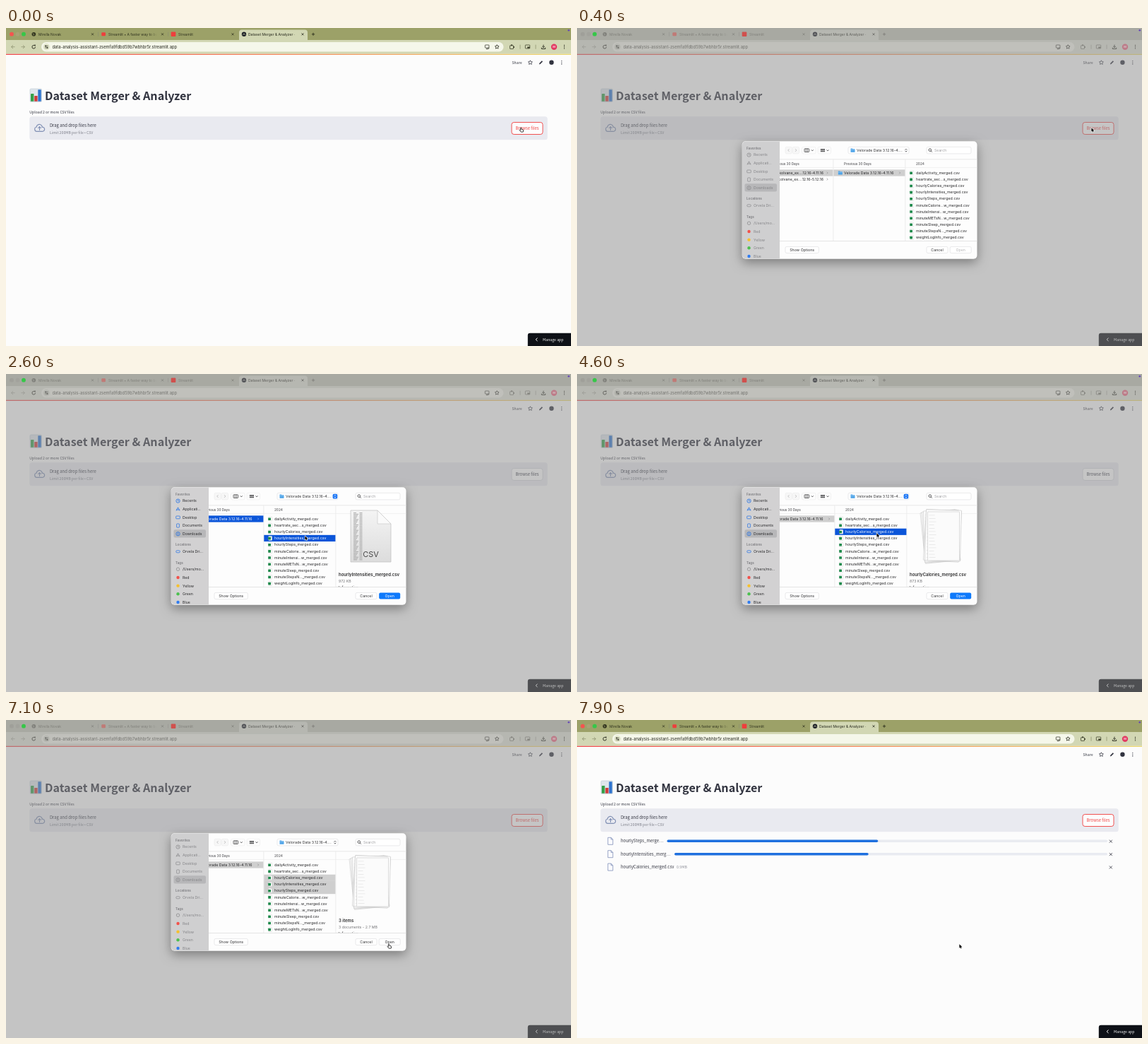
Write an HTML page with a canvas that moves like this. It is 800 px wide and 450 px high and loops after 8000 ms.

```html
<!DOCTYPE html>
<html lang="en">
<head>
<meta charset="utf-8">
<title>Dataset Merger &amp; Analyzer</title>
<style>
html, body { margin: 0; width: 100%; height: 100%; overflow: hidden; background: #fcfcfc; }
canvas { display: block; width: 800px; height: 450px; }
</style>
</head>
<body>
<canvas id="stage"></canvas>
<script>
const canvas = document.getElementById('stage');
const dpr = window.devicePixelRatio || 1;
canvas.width = 800 * dpr;
canvas.height = 450 * dpr;
const c = canvas.getContext('2d');

const LOOP = 8000, STEP = 100;
const UI = 'Inter, "Liberation Sans", sans-serif';
const SANS = '"Noto Sans CJK JP", "Noto Sans CJK SC", "Noto Sans CJK KR", "Noto Sans CJK TC", "Noto Sans CJK", "Noto Sans", sans-serif';
const SMALL = 5.2, BODY = 5.93;
const INK = '#31333f', RED = '#f0403f', BLUE = '#0b55d9';
const FOLDER = 'Velorade Data 3.12.16-4';
const FILES = ['dailyActivity', 'heartrate_sec...s', 'hourlyCalories', 'hourlyIntensities',
  'hourlySteps', 'minuteCalorie...w', 'minuteIntensi...w', 'minuteMETsN...w',
  'minuteSleep', 'minuteStepsN...', 'weightLogInfo'].map(n => n + '_merged.csv');

const clamp = v => Math.max(0, Math.min(1, v));
const ease = v => { v = clamp(v); return v * v * (3 - 2 * v); };

function mix(a, b, k) {
  const part = (h, i) => parseInt(h.slice(i, i + 2), 16);
  return 'rgb(' + [1, 3, 5].map(i => Math.round(part(a, i) + (part(b, i) - part(a, i)) * k)) + ')';
}

// Text is set large and scaled down so small sizes keep exact advances; y is the middle of the capitals.
function text(s, x, y, size, color, weight = 400, font = UI, align = 'left') {
  c.save();
  c.translate(x, y + size * 0.365);
  c.scale(0.1, 0.1);
  c.font = `${weight} ${size * 10}px ${font}`;
  c.textAlign = align;
  c.fillStyle = color;
  c.fillText(s, 0, 0);
  c.restore();
}

function box(x, y, w, h, r, fill, line, lw = 0.7) {
  c.beginPath();
  c.roundRect(x, y, w, h, r);
  if (fill) { c.fillStyle = fill; c.fill(); }
  if (line) { c.strokeStyle = line; c.lineWidth = lw; c.stroke(); }
}

function dot(x, y, r, fill, line, lw = 0.8) {
  c.beginPath();
  c.arc(x, y, r, 0, 7);
  if (fill) { c.fillStyle = fill; c.fill(); }
  if (line) { c.strokeStyle = line; c.lineWidth = lw; c.stroke(); }
}

function path(pts, x, y, line, lw = 0.9, fill) {
  c.beginPath();
  for (let i = 0; i < pts.length; i += 2) c.lineTo(x + pts[i], y + pts[i + 1]);
  if (fill) { c.closePath(); c.fillStyle = fill; c.fill(); }
  if (line) { c.strokeStyle = line; c.lineWidth = lw; c.lineJoin = 'round'; c.stroke(); }
}

function cross(x, y, r, color, lw = 0.8) {
  path([-r, -r, r, r], x, y, color, lw);
  path([-r, r, r, -r], x, y, color, lw);
}

function star(x, y, r, color) {
  const pts = [];
  for (let i = 0; i <= 10; i++) {
    const a = i * Math.PI / 5 - Math.PI / 2, q = i % 2 ? r * 0.5 : r;
    pts.push(q * Math.cos(a), q * Math.sin(a));
  }
  path(pts, x, y, color, 0.8);
}

const dots = (x, y, color) => [-2.2, 0, 2.2].forEach(d => dot(x, y + d, 0.65, color));

function chrome(k) {
  const ink = mix('#30331f', '#80807b', k), strong = mix('#24261a', '#5e5e5a', k);
  const bar = mix('#d2d7b4', '#b6b7b1', k), strip = mix('#9ca168', '#a8a9a2', k);
  const red = mix('#ee3e3c', '#c07a76', k), pale = mix('#8d9270', '#9a9a95', k);
  c.fillStyle = strip;
  c.fillRect(0, 0, 800, 18);
  c.fillStyle = bar;
  c.fillRect(0, 17, 800, 19.5);
  box(330, 2.5, 97, 17, [4, 4, 0, 0], bar);

  dot(8, 8.7, 2.9, mix('#f4544f', '#9f9f99', k));
  dot(16.5, 8.7, 2.9, mix('#a8a276', '#a2a29c', k));
  dot(25, 8.7, 2.9, '#35c748');

  dot(39.3, 8.8, 2.8, ink);
  path([-1.5, -1, 0.5, 0, -0.6, 1.6], 39.3, 8.8, strip, 0.8);
  text('Mirella Novak', 46, 8.8, 5, ink);
  box(135.3, 6.3, 5.6, 5, 1, red);
  c.save();
  c.beginPath();
  c.rect(145, 2, 69, 14);
  c.clip();
  text('Streamlit • A faster way to build', 145, 8.8, 5, ink);
  c.restore();
  const fade = c.createLinearGradient(203, 0, 214, 0);
  fade.addColorStop(0, strip.replace(')', ',0)').replace('rgb', 'rgba'));
  fade.addColorStop(1, strip);
  c.fillStyle = fade;
  c.fillRect(203, 4, 12, 10);
  box(233.7, 5.6, 6.6, 6.4, 1, mix('#ee3e3c', '#d0504d', k));
  text('Streamlit', 244, 8.8, 5, ink);
  dot(337, 8.8, 3.2, mix('#22252b', '#55565a', k));
  path([-1.7, 0.4, 0, -0.8, 1.7, 0.4], 337, 9, bar, 0.8);
  text('Dataset Merger & Analyzer · ', 343, 8.8, 5, strong);
  [122.5, 221.5, 321].forEach(x => cross(x, 8.8, 1.5, ink));
  cross(420, 8.8, 1.5, strong);
  [130.5, 229.5].forEach(x => path([0, -3, 0, 3], x, 8.8, pale, 0.8));
  path([-2.1, 0, 2.1, 0], 435, 8.8, ink);
  path([0, -2.1, 0, 2.1], 435, 8.8, ink);
  dot(796.8, 3.2, 1.3, '#6546b8');

  [[10, 1], [24, -1]].forEach(([x, d]) => {
    path([-2.5 * d, 0, 2.5 * d, 0], x, 26.7, pale, 0.8);
    path([0, -2.3, -2.5 * d, 0, 0, 2.3], x, 26.7, pale, 0.8);
  });
  c.beginPath();
  c.arc(39.2, 26.8, 2.3, 0, 5.2);
  c.strokeStyle = strong;
  c.lineWidth = 0.9;
  c.stroke();
  path([0, -2, 2, 0, 2.4, -2.6], 39.4, 26, null, 0, strong);
  box(50, 20, 654.5, 13.4, 6.7, mix('#f5f7ea', '#c0c0bb', k));
  dot(57.3, 26.7, 4.6, mix('#dfe3c8', '#b4b5af', k));
  [-1.2, 1.2].forEach(d => {
    path([-2.2, 0, 2.2, 0], 57.3, 26.7 + d, strong, 0.7);
    dot(57.3 + d, 26.7 + d, 0.9, strong);
  });
  text('data-analysis-assistant-zsemfa9fdbd59b7wbhbr5r.streamlit.app', 65.5, 26.7, 5.8, mix('#24261c', '#73736f', k));

  box(678.3, 24, 5.6, 4, 0.6, null, strong);
  path([-1.4, 0, 1.4, 0], 681.2, 29.6, strong);
  path([0, 1.8, 0, 3.4, 1.5, 2.2], 683, 26, strong, 0.7);
  star(695.2, 26.7, 3, strong);
  box(713.5, 24.7, 5, 4.8, 0.5, null, ink);
  dot(716, 24.2, 1, ink);
  dot(719, 27, 1, ink);
  [728, 750].forEach(x => path([0, -3, 0, 3], x, 26.7, pale, 0.8));
  box(735.3, 24, 6.4, 5, 0.6, null, ink);
  path([0, 0, 3.4, 0, 3.4, 2, 0, 2], 738.2, 26.6, null, 0, ink);
  path([0, -3, 0, 1], 761, 26.7, strong);
  path([-1.7, -0.7, 0, 1, 1.7, -0.7], 761, 26.7, strong);
  path([-2.7, 1, -2.7, 2.8, 2.7, 2.8, 2.7, 1], 761, 26.7, strong);
  dot(776, 26.7, 4.2, mix('#e23b63', '#bd7b88', k));
  text('M', 776, 26.7, 4, mix('#ffffff', '#d9d9d9', k), 500, UI, 'center');
  dots(790.5, 26.7, strong);
}

function docIcon(x, y) {
  path([-3.4, -5, 1, -5, 3.6, -2.3, 3.6, 5, -3.4, 5], x, y, '#7e8fb8', 0.8, '#fcfcfe');
  path([1, -5, 1, -2.3, 3.6, -2.3], x, y, '#7e8fb8', 0.8);
}

function uploads(t) {
  const grow = (t - 7500) / 400;
  const rows = [['hourlySteps_merge…', 127.5, 0.479], ['hourlyIntensities_merg…', 138, 0.448], ['hourlyCalories_merged.csv', 0, 0]];
  rows.forEach(([name, x, p], i) => {
    const y = 171.3 + i * 18.4;
    docIcon(47.2, y);
    text(name, 62, y - 0.2, BODY, INK, 400, SANS);
    if (x) {
      box(x, y - 1.8, 751 - x, 3.5, 1.7, '#e9ebf1');
      const w = (751 - x) * p * grow;
      if (w > 1) box(x, y - 1.8, w, 3.5, 1.7, '#1f70df');
    } else {
      text('0.9MB', 141, y, SMALL, '#8b8d97', 400, SANS);
    }
    cross(755.8, y + 0.4, 2, INK, 0.8);
  });
}

function page(hover) {
  c.fillStyle = '#fcfcfc';
  c.fillRect(0, 36, 800, 414);
  const line = c.createLinearGradient(0, 0, 800, 0);
  line.addColorStop(0, '#f0484c');
  line.addColorStop(0.5, '#f7895c');
  line.addColorStop(1, '#ecd96e');
  c.fillStyle = line;
  c.fillRect(0, 36.5, 800, 1.5);

  text('Share', 716.5, 49, SMALL, INK, 400, SANS);
  star(742.4, 48.9, 3.1, INK);
  path([-2.4, 2.5, -2, 0.8, 1.5, -2.7, 2.7, -1.5, -0.8, 2], 757.3, 48.9, null, 0, INK);
  dot(772.4, 48.7, 3.2, INK);
  dots(786.8, 48.8, INK);

  box(34, 86, 16.5, 18.5, 1.5, '#dfe6ec', '#b9c6d2', 0.6);
  [[35, 93, '#36a04a'], [40.2, 96, '#cf3b3b'], [45.3, 87.3, '#2f74cf']].forEach(([x, y, f]) => box(x, y, 4.4, 103.8 - y, 0.4, f));
  text('Dataset Merger & Analyzer', 55, 96, 16.1, INK, 700, SANS);
  text('Upload 2 or more CSV files', 33.2, 118.7, SMALL, INK, 400, SANS);

  box(33.3, 125.3, 733.4, 33, 3.5, '#e9eaf0');
  c.beginPath();
  c.arc(43.9, 143.2, 3.2, 1.5, 4.6);
  c.arc(47.2, 140.6, 4.2, 3.4, 6);
  c.arc(51.6, 143.3, 3, 4.5, 1.6);
  c.closePath();
  c.strokeStyle = '#8190b4';
  c.lineWidth = 1.2;
  c.stroke();
  path([0, 4.5, 0, -1], 47.5, 140.5, '#8190b4', 1.1);
  path([-2, 1, 0, -1.2, 2, 1], 47.5, 140.8, '#8190b4', 1.1);
  text('Drag and drop files here', 62, 137.5, BODY, INK, 400, SANS);
  text('Limit 200MB per file • CSV', 62, 147.7, SMALL, '#7d7f89', 400, SANS);
  box(716, 133.5, 44, 17, 3.2, '#fdfdfe', hover ? RED : '#d3d5db', 0.9);
  text('Browse files', 738, 142.1, BODY, hover ? RED : INK, 400, SANS, 'center');

  box(738.8, 431.8, 62, 19, [3, 0, 0, 0], '#0e1117');
  path([1.2, -2.2, -1.2, 0, 1.2, 2.2], 751.3, 440.8, '#fafafa', 1);
  text('Manage app', 760, 440.8, SMALL, '#fafafa', 400, SANS);
}

function folderIcon(x, y, fill = '#4da3e8') {
  path([-3, -2.6, -0.6, -2.6, 0.2, -1.8, 3, -1.8, 3, 2.6, -3, 2.6], x, y, null, 0, fill);
  path([-3, -0.8, 3, -0.8], x, y, '#a9d6f7', 0.6);
}

function sidebar(on) {
  box(234, 160.5, 53, 166, [5, 0, 0, 5], on ? '#d2d1d2' : '#cfcfd0');
  box(237.5, 220.2, 45.5, 11.4, 2, '#b7b7b9');
  const head = (s, y) => text(s, 240, y, 4.6, '#7d7d80', 600);
  head('Favorites', 170.2);
  head('Locations', 241.7);
  head('Tags', 267);
  const label = on ? '#29292b' : '#858588', tint = on ? '#1b6ce5' : '#89898c';
  const item = (s, y) => text(s, 250, y, 5.2, label);
  ['Recents', 'Applicati...', 'Desktop', 'Documents', 'Downloads'].forEach((s, i) => {
    const y = 179.6 + i * 11.65;
    item(s, y);
    if (i === 0 || i === 4) {
      dot(243.5, y, 2.6, null, tint);
      path(i ? [0, -1.5, 0, 1.4] : [0, -1.5, 0, 0.2, 1.2, 0.2], 243.5, y, tint, 0.7);
    } else if (i === 1) {
      path([-2.4, 2.2, 0, -2.4, 2.4, 2.2], 243.5, y, tint, 0.8);
      path([-2.6, 0.9, 2.6, 0.9], 243.5, y, tint, 0.7);
    } else if (i === 2) {
      box(240.7, y - 1.9, 5.6, 3.8, 0.7, null, tint);
    } else {
      box(241.6, y - 2.6, 3.8, 5.2, 0.6, null, tint);
    }
  });
  item('Orvela Dri...', 251.2);
  box(240.7, 249.8, 5.6, 3, 1.5, null, tint);
  item('/Users/mo...', 276.2);
  dot(243.5, 276.2, 2.2, null, '#77777a', 0.6);
  [['Red', '#f2514b'], ['Yellow', '#f6c02c'], ['Green', '#4cc04f'], ['Blue', '#2f7cf0']].forEach(([s, f], i) => {
    const y = 288 + i * 11.65;
    item(s, y);
    dot(243.5, y, 2.2, f);
  });
}

function sheet(x, y, w, h, turn) {
  c.save();
  c.translate(x, y);
  c.rotate(turn);
  box(-w / 2, -h / 2, w, h, 0.5, '#fbfbfb', '#bdbdbd', 0.5);
  c.fillStyle = '#dedede';
  for (let i = 1; i < 15; i++) c.fillRect(-w / 2 + 2, -h / 2 + i * h / 15, 7 + i * 5 % 4, 0.6);
  c.restore();
}

function preview(t, x) {
  const stack = t >= 3700 && t < 4700 || t >= 5600;
  if (stack) {
    [-0.1, -0.065, -0.03, 0.06, 0.03].forEach((a, i) => sheet(x + 47.5 + i, 230 - i * 0.4, 50, 72, a));
    sheet(x + 52, 229.5, 45, 69, 0);
  } else {
    const g = c.createLinearGradient(0, 193, 0, 266);
    g.addColorStop(0, '#f4f4f4');
    g.addColorStop(1, '#dcdcdc');
    path([0, 0, 38, 0, 57, 19, 57, 73, 0, 73], x + 21, 193, '#bdbdbd', 0.7, g);
    path([38, 0, 38, 19, 57, 19], x + 21, 193, '#c4c4c4', 0.6, '#fafafa');
    c.fillStyle = '#a4a4a4';
    for (let i = 0; i < 36; i++) {
      c.fillRect(x + 25, 196 + i * 1.9, 4 + i * 7 % 4, 0.9);
      c.fillRect(x + 33.5, 196 + i * 1.9, 4 + i * 5 % 5, 0.9);
    }
    text('CSV', x + 49.5, 255.2, 11, '#4a4a4a', 400, UI, 'center');
  }
  const [name, size] = t < 3700 ? [FILES[3], '972 KB'] : t < 4600 ? ['2 items', '2 documents - 1.8 MB']
    : t < 5600 ? [FILES[2], '873 KB'] : ['3 items', '3 documents - 2.7 MB'];
  text(name, x + 4, 284.2, 6, '#2a2a2b', 600);
  text(size, x + 4, 292.8, 5.25, '#747477');
  text('Information', x + 4, 302.3, 5, '#2a2a2b', 600);
}

function columns(t, on) {
  const shift = 100 * ease((t - 2300) / 200);
  const sel = t < 2400 ? [] : t < 3700 ? [3] : t < 4600 ? [2, 3] : t < 5600 ? [2] : [2, 3, 4];
  const grey = '#cfcfcf', ink = '#242426';
  c.save();
  c.beginPath();
  c.rect(287, 186, 279.5, 115.5);
  c.clip();
  c.translate(-shift, 0);
  const head = (s, x) => text(s, x, 192.2, 4.6, '#6b6b6e', 600);
  head('Previous 30 Days', 276);
  head('Previous 30 Days', 378);
  head('2024', 480);
  c.fillStyle = '#ececec';
  c.fillRect(260, 197, 420, 0.7);
  [362.4, 464.4, 566.4].forEach(x => c.fillRect(x, 186, 0.9, 116));

  const rowBar = (x, w, y, f) => { c.fillStyle = f; c.fillRect(x, y - 4.6, w, 9.2); };
  const arrow = (x, y, f) => path([-0.7, -1.4, 0.7, 0, -0.7, 1.4], x, y, f, 0.7);
  rowBar(260, 102.4, 205, grey);
  text('kolvane_ex....12.16-4.11.16', 349, 205, 5.3, ink, 400, UI, 'right');
  text('kolvane_ex....12.16-5.12.16', 349, 214.1, 5.3, ink, 400, UI, 'right');
  [205, 214.1].forEach(y => arrow(354.5, y, '#8b8b8d'));
  const live = on && t < 2700;
  rowBar(363.3, 101.1, 205, live ? BLUE : grey);
  folderIcon(372.8, 205);
  text(FOLDER + '.11.16', 378, 205, 5.3, live ? '#ffffff' : ink);
  arrow(457, 205, live ? '#8fb4f4' : '#8b8b8d');

  FILES.forEach((name, i) => {
    const y = 205 + i * 9.14, picked = sel.includes(i);
    if (picked) rowBar(465.3, 101.1, y, on ? BLUE : grey);
    box(471.8, y - 3, 4.8, 6, 0.4, '#ffffff', '#c4c9c6', 0.4);
    box(471.2, y - 1.6, 3.8, 3.6, 0.4, '#1f8a4c');
    text(name, 480, y, 5.3, picked && on ? '#ffffff' : ink);
  });
  if (t >= 2400) preview(t, 567);
  c.restore();
}

function dialog(t, o, on) {
  c.save();
  c.globalAlpha = o;
  c.translate(0, -16 * (1 - o));
  c.save();
  c.shadowColor = 'rgba(0,0,0,.38)';
  c.shadowBlur = 16 * dpr;
  c.shadowOffsetY = 5 * dpr;
  box(233.7, 160.3, 332.8, 166.4, 5, '#fdfdfd');
  c.restore();
  c.save();
  c.beginPath();
  c.roundRect(233.7, 160.3, 332.8, 166.4, 5);
  c.clip();
  sidebar(on);
  c.fillStyle = '#e2e2e2';
  c.fillRect(287, 185.5, 280, 0.8);
  columns(t, on);
  c.fillStyle = '#dfdfdf';
  c.fillRect(287, 301.2, 280, 0.8);

  const edge = '#dcdcde', ink = '#2e2e30', down = [-1.4, -0.7, 0, 0.8, 1.4, -0.7];
  [[295, 1], [305.3, -1]].forEach(([x, d]) => {
    box(x, 168.3, 9.3, 9.6, 1.8, '#f7f7f7', '#e6e6e6', 0.5);
    path([0.9 * d, -1.9, -0.9 * d, 0, 0.9 * d, 1.9], x + 4.6, 173, '#b5b5b7', 0.8);
  });
  box(318.5, 168.3, 19.5, 9.6, 1.8, '#fdfdfd', '#e6e6e6', 0.5);
  box(322, 170.8, 6.6, 4.6, 0.6, null, ink);
  [324.2, 326.4].forEach(x => path([0, 0, 0, 4.6], x, 170.8, ink, 0.6));
  path(down, 333.3, 173.1, ink, 0.8);
  box(341, 168.3, 18.5, 9.6, 1.8, '#fdfdfd', '#e6e6e6', 0.5);
  for (let i = 0; i < 6; i++) box(345 + i % 3 * 2.1, 170.9 + (i > 2 ? 2.5 : 0), 1.6, 1.8, 0.2, ink);
  path(down, 355, 173.1, ink, 0.8);

  box(384, 168.3, 86, 9.6, 2, '#ffffff', edge, 0.6);
  folderIcon(390.5, 173.1);
  text(FOLDER + '....', 396, 173.1, 5.3, ink);
  if (on) box(462.6, 169.8, 6.6, 6.8, 1.6, '#1a75f5');
  const tick = on ? '#ffffff' : ink;
  path([-1.3, -0.7, 0, -2, 1.3, -0.7], 465.9, 173.2, tick, 0.8);
  path([-1.3, 0.7, 0, 2, 1.3, 0.7], 465.9, 173.2, tick, 0.8);

  box(495, 168.3, 63, 9.6, 2, '#ffffff', edge, 0.6);
  dot(499.8, 172.6, 1.8, null, ink, 0.8);
  path([0, 0, 1.7, 1.7], 501.1, 173.9, ink, 0.8);
  text('Search', 506, 173.1, 5.2, '#a0a0a3');

  const button = (s, x, w, fill, color) => {
    box(x, 309.4, w, 9.2, 2, fill, fill === '#ffffff' ? edge : null, 0.6);
    text(s, x + w / 2, 314, 5.3, color, 400, UI, 'center');
  };
  button('Show Options', 295, 47.3, '#ffffff', ink);
  button('Cancel', 495, 30, '#ffffff', ink);
  if (on) button('Open', 528.2, 30, '#0d79fb', '#ffffff');
  else button('Open', 528.2, 30, '#ffffff', t < 1200 ? '#b4b4b6' : ink);
  c.restore();
  c.restore();
}

const MOVES = [[0, 729, 144], [700, 729, 144], [1500, 446, 236], [2200, 424, 232], [3200, 424, 232],
  [3600, 425, 228], [5100, 425, 228], [5500, 425, 241], [6200, 425, 241], [6900, 542, 320], [LOOP, 542, 320]];

function cursor(t) {
  const i = Math.max(1, MOVES.findIndex(m => m[0] > t));
  const [t0, x0, y0] = MOVES[i - 1], [t1, x1, y1] = MOVES[i];
  const k = ease((t - t0) / (t1 - t0));
  const x = x0 + (x1 - x0) * k, y = y0 + (y1 - y0) * k;
  if (t < 200 || t >= 6900 && t < 7400) {
    path([-1.2, -2.6, -0.4, -3.2, 0.3, -2.6, 0.4, -0.7, 2.5, -0.2, 3.2, 0.5, 2.6, 2.9, -0.5, 2.9, -2.5, 0.4, -1.9, -0.2, -1.1, 0.4, -1.2, -2.6],
      x + 0.6, y + 0.2, '#111111', 0.8, '#ffffff');
  } else {
    path([0, 0, 0, 5.6, 1.3, 4.5, 2.1, 6.3, 3, 5.9, 2.2, 4.1, 4, 4.1], x - 0.6, y - 2.8, '#ffffff', 1.2, '#000000');
    path([0, 0, 0, 5.6, 1.3, 4.5, 2.1, 6.3, 3, 5.9, 2.2, 4.1, 4, 4.1], x - 0.6, y - 2.8, null, 0, '#000000');
  }
}

function openness(t) {
  if (t < 100 || t >= 7400) return 0;
  if (t < 300) return t < 200 ? 0.25 : 0.75;
  return t < 7200 ? 1 : t < 7300 ? 0.75 : 0.25;
}

function draw(t) {
  const o = openness(t), on = t >= 1200 && t < 7000;
  c.setTransform(dpr, 0, 0, dpr, 0, 0);
  page(t < 900 || t >= 7000);
  if (t >= 7500) uploads(t);
  if (o) {
    c.fillStyle = `rgba(142,142,142,${0.5 * o})`;
    c.fillRect(0, 36, 800, 414);
  }
  chrome(o);
  if (o) dialog(t, o, on);
  cursor(t);
}

function tick(now) {
  draw(Math.floor(now % LOOP / STEP) * STEP);
  requestAnimationFrame(tick);
}
const start = performance.now();
draw(0);
requestAnimationFrame(function loop() {
  tickAt(performance.now() - start);
  requestAnimationFrame(loop);
});
function tickAt(ms) {
  draw(Math.floor(Math.max(0, ms) % LOOP / STEP) * STEP);
}
</script>
</body>
</html>
```
